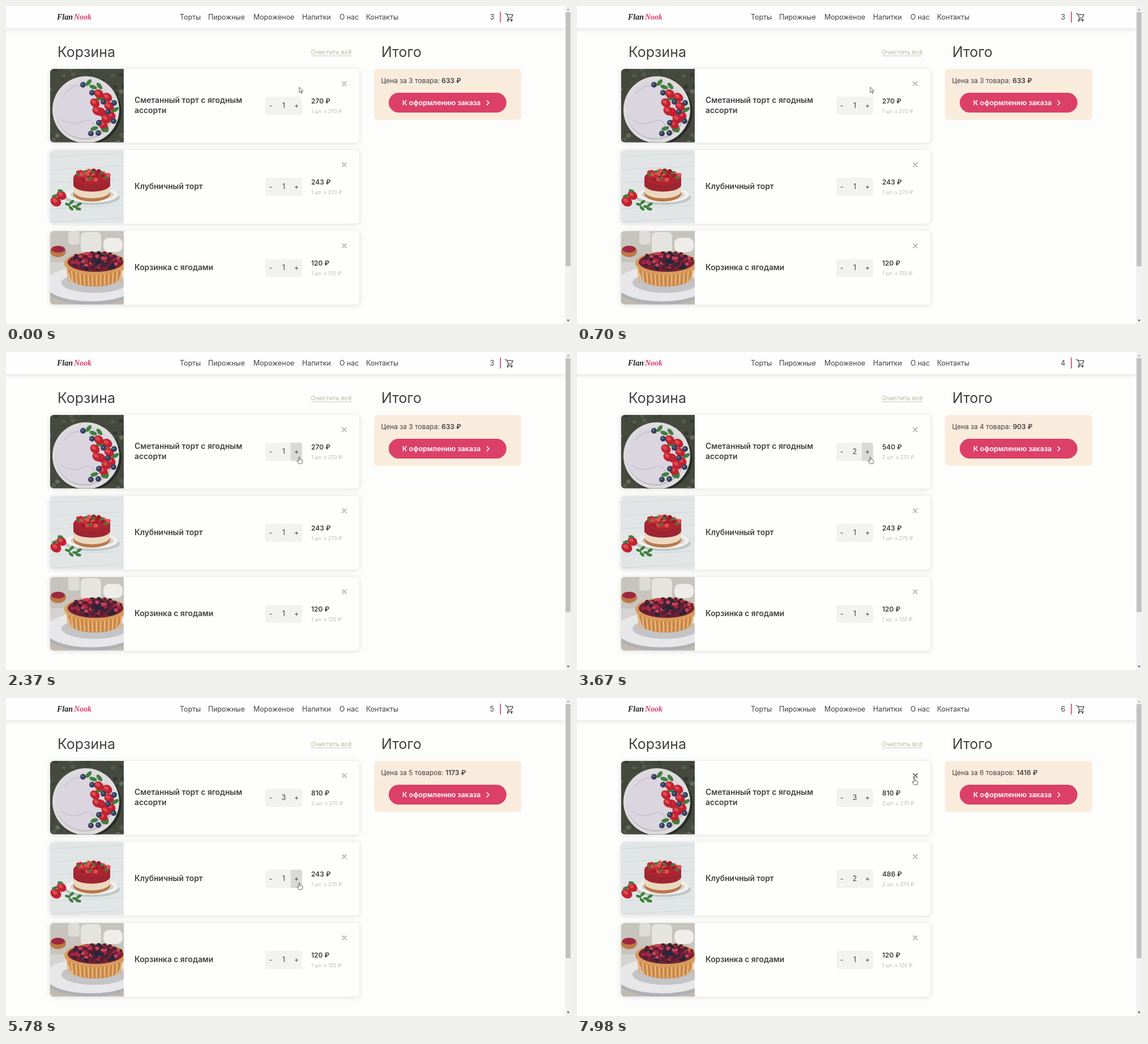
Write an HTML page that moves like this. It is 998 px wide and 561 px high and loops after 8 s.

```html
<!DOCTYPE html>
<html lang="ru">
<head>
<meta charset="utf-8">
<title>Корзина</title>
<style>
  html, body { margin: 0; width: 100%; height: 100%; overflow: hidden; background: #fdfdfc; }
  svg { display: block; width: 100vw; height: 100vh; }
  text { font: 12.4px Inter, Roboto, sans-serif; fill: #414042; white-space: pre; }
  .logo { font: italic bold 14px "Liberation Serif", serif; fill: #222; }
  .pink { fill: #dc4169; }
  .heading { font-size: 25px; }
  .clear { font-size: 10.9px; fill: #b9b89d; }
  .title { font-size: 13.8px; font-weight: 600; }
  .price { font-size: 12px; font-weight: 600; }
  .unit { font-size: 9px; fill: #b9b9b9; }
  .total { font-size: 12px; }
  .button { font-weight: 600; fill: #fff; }
  .mid { text-anchor: middle; }
  .line { fill: none; stroke-linecap: round; stroke-linejoin: round; }
</style>
</head>
<body>
<svg id="stage" viewBox="0 0 998 561" preserveAspectRatio="none"></svg>
<script>
const stage = document.getElementById('stage');
const LOOP = 8000;

let seed = 7;
const random = () => (seed = seed * 16807 % 2147483647) / 2147483647;
const text = (x, y, cls, content, id = '') =>
  `<text x="${x}" y="${y}" class="${cls}" id="${id}">${content}</text>`;
const rect = (x, y, w, h, fill, r = 0, extra = '') =>
  `<rect x="${x}" y="${y}" width="${w}" height="${h}" rx="${r}" fill="${fill}" ${extra}/>`;
const oval = (x, y, rx, ry, fill, angle = 0) =>
  `<ellipse cx="${x}" cy="${y}" rx="${rx}" ry="${ry}" fill="${fill}" transform="rotate(${angle} ${x} ${y})"/>`;
const path = (d, fill, extra = '') => `<path d="${d}" fill="${fill}" ${extra}/>`;
const scatter = (count, make) => Array.from({ length: count }, (_, i) => make(i)).join('');

// Random berries inside an ellipse
const berries = (count, x, y, rx, ry, size, colors) => scatter(count, i => {
  const a = random() * 2 * Math.PI, d = Math.sqrt(random());
  return oval(x + rx * d * Math.cos(a), y + ry * d * Math.sin(a), size, size * .9, colors[i % colors.length]);
});

const leaf = (x, y, angle, size = 7) => oval(x, y, size, size * .5, '#3f7f3c', angle);
const blueberry = (x, y) => oval(x, y, 5, 5, '#323d59') + oval(x - 1, y - 1, 2, 2, '#65718b');
const strawberry = (x, y, size = 9) =>
  oval(x, y, size, size * .82, '#bf2332', 35) + oval(x - 2, y - 2, size * .5, size * .35, '#df4b4e', 35);

function creamCake() {
  const red = [[86, 44], [79, 60], [101, 50], [90, 76], [104, 66], [83, 74], [107, 82], [93, 98], [99, 88]];
  const blue = [[58, 28], [74, 42], [94, 58], [113, 60], [102, 76], [86, 95], [72, 114], [85, 113], [112, 92]];
  const green = [[68, 24, -50], [76, 32, 20], [87, 30, 50], [115, 72, -30], [96, 108, 20], [78, 105, -15], [99, 103, 60], [88, 52, 0]];
  return rect(0, 0, 130, 130, '#45493e') +
    berries(75, 65, 65, 88, 88, 4, ['#343a31', '#555b4c', '#3d4937', '#686c60']) +
    oval(66, 76, 60, 58, '#292d28') + oval(63, 72, 59, 59, '#dedbdd') +
    oval(61, 73, 52, 52, '#c5c0c8') + oval(60, 71, 51, 51, '#dad5df') +
    path('M18 88q20 14 38 5t24 12M25 45q14-18 30-15', 'none', 'stroke="#cbc5d1" stroke-width="2"') +
    green.map(p => leaf(...p)).join('') + red.map(p => strawberry(...p)).join('') +
    blue.map(p => blueberry(...p)).join('');
}

function strawberryCake() {
  return rect(0, 0, 130, 130, '#e1e5e6') +
    scatter(6, i => path(`M0 ${12 + i * 23}L130 ${5 + i * 23}`, 'none', 'stroke="#d0d8d9"')) +
    oval(74, 84, 49, 13, '#c0c7c8') + oval(74, 79, 46, 14, '#f2f0ed') + oval(74, 79, 38, 10, '#d5d0ca') +
    path('M41 48v31c7 16 58 16 65 0V48z', '#b97849') +
    path('M41 48v26c7 15 58 15 65 0V48z', '#ead9c0') +
    path('M41 48v15c7 14 58 14 65 0V48z', '#9f2532') +
    oval(73.5, 49, 32.5, 13, '#ab2532') +
    berries(38, 73, 45, 30, 9, 4, ['#c52b36', '#9d1c2a', '#df5550']) +
    [[50, 43, 30], [62, 38, -20], [76, 39, 30], [91, 41, -30], [99, 49, 20], [70, 50, -10]].map(p => leaf(...p, 4)).join('') +
    strawberry(10, 91, 10) + strawberry(20, 80, 9) + leaf(18, 72, 15, 5) + leaf(8, 81, -20, 5) +
    [[31, 96, 20], [38, 92, -40], [44, 100, 15], [51, 96, -30], [37, 103, 45], [50, 104, 10]].map(p => leaf(...p, 5)).join('');
}

function berryTart() {
  return rect(0, 0, 130, 130, '#d5d3cf') + rect(0, 0, 130, 55, '#c7c4be') +
    rect(54, 2, 36, 38, '#e6e4df', 8) + rect(94, 12, 34, 25, '#efede9', 10) + rect(32, 0, 20, 24, '#dedcd7', 5) +
    oval(14, 36, 14, 10, '#bd7844') + oval(14, 32, 12, 6, '#9c2941') +
    path('M0 110q50-15 130 5v15H0z', '#c1b9ae') +
    oval(72, 99, 82, 31, '#adb0b4') + oval(72, 93, 82, 31, '#e7e7e9') + oval(78, 91, 58, 18, '#c4c3c6') +
    path('M26 55l12 33c15 13 67 13 82 0l14-33z', '#c78447') +
    scatter(14, i => path(`M${30 + i * 7.4} ${66 + 7 * Math.sin(i / 13 * Math.PI)}l${3 - i * .4} 24`, 'none', 'stroke="#e6b374" stroke-width="3"')) +
    oval(80, 57, 55, 21, '#d89b5b') + oval(80, 55, 49, 17, '#722235') +
    berries(105, 80, 53, 46, 15, 3.4, ['#a62742', '#37263a', '#ce4259', '#571d32', '#272638']);
}

const items = [
  { title: ['Сметанный торт с ягодным', 'ассорти'], price: 270, unit: 270, photo: creamCake },
  { title: ['Клубничный торт'], price: 243, unit: 270, photo: strawberryCake },
  { title: ['Корзинка с ягодами'], price: 120, unit: 120, photo: berryTart }
];

const card = (item, i) => `<g transform="translate(0 ${111 + i * 143})">
  ${rect(78, 0, 546, 129.5, '#fefefd', 6, 'filter="url(#soft)"')}
  <g transform="translate(78 0)" clip-path="url(#photo)">${item.photo()}</g>
  ${item.title.map((line, n) => text(227, (item.title.length > 1 ? 60 : 69) + n * 18, 'title', line)).join('')}
  ${rect(458, 49, 65, 32, '#f2f2f0', 4)}
  ${path('M503 49h16a4 4 0 0 1 4 4v24a4 4 0 0 1-4 4h-16z', '#d9d9d8', `id="plus${i}"`)}
  ${text(467.5, 68.5, 'mid', '-')}${text(490.5, 68.5, 'mid', '', 'count' + i)}${text(513, 68.5, 'mid', '+')}
  ${path('M594 22.5l7 7m0-7l-7 7', 'none', `id="close${i}" class="line" stroke-width="1.2"`)}
  ${text(539, 60.5, 'price', '', 'price' + i)}${text(539, 77.5, 'unit', '', 'unit' + i)}
</g>`;

const nav = [[307, 'Торты'], [357, 'Пирожные'], [437, 'Мороженое'], [523, 'Напитки'], [589, 'О нас'], [636, 'Контакты']];

const pointer = id => `<g id="${id}" stroke="#505050" stroke-width=".9" stroke-linejoin="round">
  ${path('M0 0v9.6l2.2-2 1.6 3.6 1.5-.7-1.6-3.4h3z', '#fff', 'class="arrow"')}
  ${path('M-1 .8Q0-.5 1 .8V5l1.4-.4 1.2.7 1.3-.1.9 1V9L4.8 12H-.8L-3.6 8Q-4 6.4-2.6 6.5L-1 8z', '#fff', 'class="hand"')}
</g>`;

stage.innerHTML = `
<defs>
  <filter id="soft" x="-10%" y="-30%" width="120%" height="160%">
    <feDropShadow dx="0" dy="1" stdDeviation="4" flood-color="#333" flood-opacity=".14"/>
  </filter>
  <clipPath id="photo"><path d="M6 0h124v129.5H6a6 6 0 0 1-6-6V6a6 6 0 0 1 6-6z"/></clipPath>
</defs>
${rect(0, 0, 998, 561, '#fdfdfc')}
${rect(-20, -10, 1008, 49, '#fefefe', 0, 'filter="url(#soft)"')}
${text(90, 24, 'logo', 'Flan')}${text(120, 24, 'logo pink', 'Nook')}
${nav.map(([x, label]) => text(x, 24, '', label)).join('')}
${text(858.5, 24, 'mid', '', 'cartCount')}
${rect(872.5, 10, 1.7, 19, '#d3406b')}
${path('M881.5 13.5h2.3l4 7.5h5l2.6-5.8H885M887.6 21l-1.7 2.8h9', 'none', 'class="line" stroke="#414042" stroke-width="1.2"')}
${oval(886.3, 26, 1.4, 1.4, '#414042')}${oval(893, 26, 1.4, 1.4, '#414042')}
${text(91, 90, 'heading', 'Корзина')}${text(663, 90, 'heading', 'Итого')}
${text(538.5, 84.5, 'clear', 'Очистить всё')}${rect(538.5, 87.5, 72, .9, '#c3c2aa')}
${items.map(card).join('')}
${rect(650, 111, 260, 90, '#faecdc', 6)}
<text x="662.5" y="136" class="total"><tspan id="totalLabel"></tspan><tspan id="totalSum" font-weight="600"></tspan></text>
${rect(676, 153, 208, 35, '#dc4068', 17.5)}
${text(700, 175, 'button', 'К оформлению заказа')}
${path('M849.5 167l3.5 3.7-3.5 3.7', 'none', 'class="line" stroke="#fff" stroke-width="1.6"')}
${rect(987.5, 0, 10.5, 561, '#f1f1f1')}${rect(988.5, 11, 8.5, 448, '#c1c1c1')}
${path('M990.5 7.5l2.5-3 2.5 3z', '#a3a3a3')}${path('M990.5 553.5l2.5 3 2.5-3z', '#505050')}
${pointer('pointerA')}${pointer('pointerB')}`;

const el = id => document.getElementById(id);
const clamp = v => Math.max(0, Math.min(1, v));

const clicks = [[2950, 0], [4000, 0], [6300, 1]];
const hovers = { plus0: [1765, 4550], plus1: [5040, 6710], close0: [7250, LOOP + 1000] };
const route = [[1500, 518, 143], [2100, 518, 185], [4450, 518, 185], [5250, 518, 326], [6600, 518, 326], [7350, 596, 141]];

function hoverAmount(id, t) {
  const [start, end] = hovers[id] || [LOOP, LOOP];
  return clamp((t - start) / 300) - clamp((t - end) / 300);
}

function position(t) {
  const next = route.findIndex(stop => stop[0] > t);
  if (next <= 0) return (next ? route.at(-1) : route[0]).slice(1);
  const [t0, x0, y0] = route[next - 1], [t1, x1, y1] = route[next];
  const p = (t - t0) / (t1 - t0), ease = p * p * (3 - 2 * p);
  return [x0 + (x1 - x0) * ease, y0 + (y1 - y0) * ease];
}

function drawPointer(id, t, opacity) {
  const node = el(id), [x, y] = position(t);
  const overControl = Object.values(hovers).some(([start, end]) => t >= start && t < end);
  node.setAttribute('transform', `translate(${x} ${y})`);
  node.setAttribute('opacity', opacity);
  node.querySelector('.arrow').style.display = overControl ? 'none' : '';
  node.querySelector('.hand').style.display = overControl ? '' : 'none';
}

function draw(t) {
  let total = 0, sum = 0;
  items.forEach((item, i) => {
    const count = 1 + clicks.filter(([time, index]) => index === i && t >= time).length;
    total += count;
    sum += count * item.price;
    el('count' + i).textContent = count;
    el('price' + i).textContent = `${count * item.price} ₽`;
    el('unit' + i).textContent = `${count} шт. x ${item.unit} ₽`;
    el('plus' + i).setAttribute('opacity', hoverAmount('plus' + i, t));
    const shade = 152 - 105 * hoverAmount('close' + i, t);
    el('close' + i).setAttribute('stroke', `rgb(${shade},${shade},${shade})`);
  });
  el('cartCount').textContent = total;
  el('totalLabel').textContent = `Цена за ${total} товар${total < 5 ? 'а' : 'ов'}: `;
  el('totalSum').textContent = `${sum} ₽`;

  // A moving pointer blends two neighbouring positions
  const moving = String(position(t)) !== String(position(t + 33));
  drawPointer('pointerA', t, moving ? .5 : 1);
  drawPointer('pointerB', t + 33, moving ? .5 : 0);
}

function tick() {
  draw(performance.now() % LOOP);
  requestAnimationFrame(tick);
}
tick();
</script>
</body>
</html>
```
